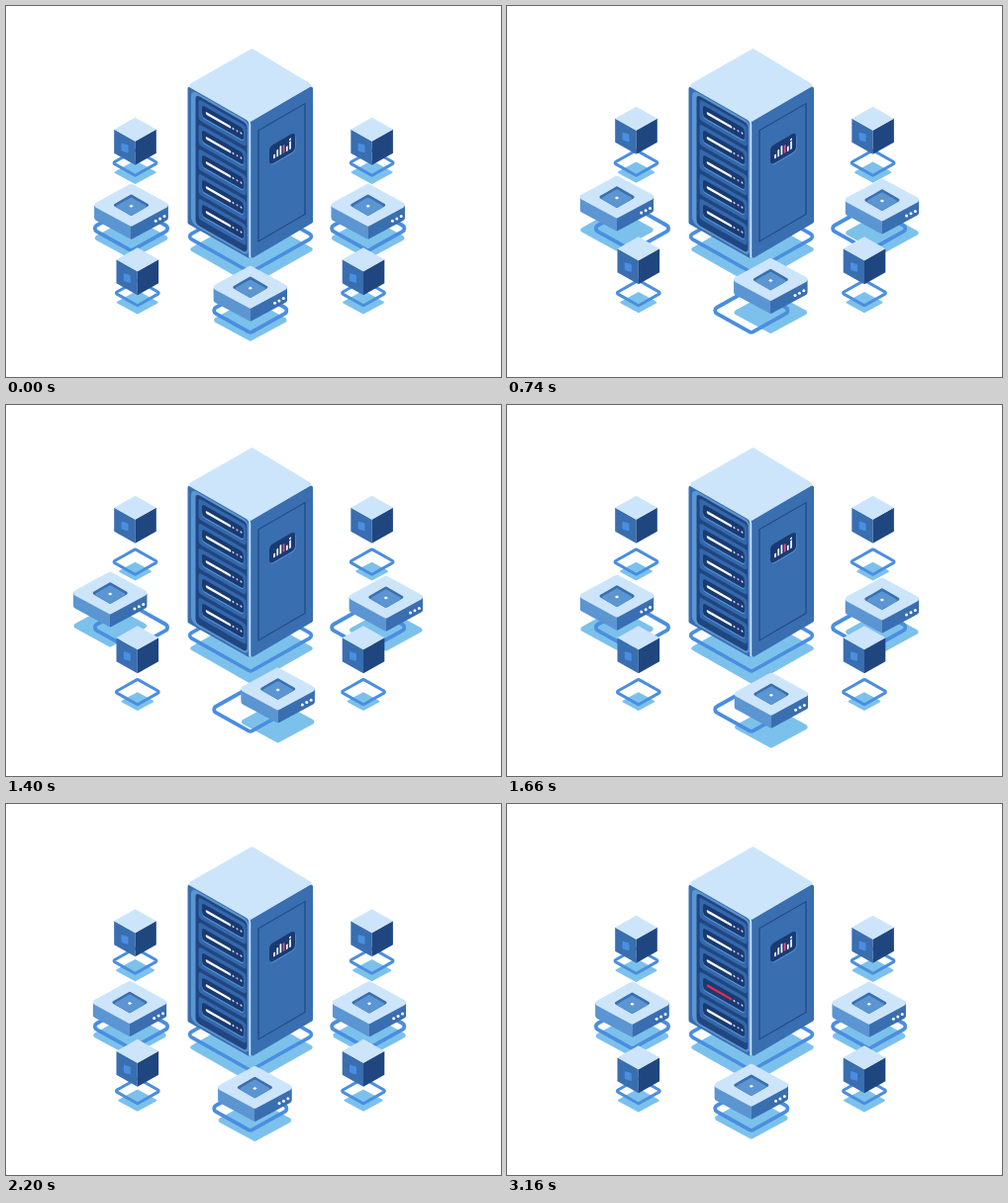
Write an HTML page with a canvas that moves like this. It is 500 px wide and 375 px high and loops after 3.58 s.

```html
<!DOCTYPE html>
<html lang="en">
<head>
<meta charset="utf-8">
<style>
  html, body { margin: 0; width: 100%; height: 100%; overflow: hidden; background: #fff; }
  canvas { display: block; width: 500px; height: 375px; }
</style>
</head>
<body>
<canvas id="stage" width="500" height="375"></canvas>
<script>
const ctx = document.getElementById('stage').getContext('2d');
const LOOP = 3580;
const PALE = '#cce5fb', SKY = '#7cc1eb', RING = '#4a8ee0', LIGHT = '#5b95d2',
      MID = '#396eb0', DARK = '#204680', NAVY = '#193a72', RED = [226, 44, 70];

const ease = p => (1 - Math.cos(Math.PI * Math.min(1, Math.max(0, p)))) / 2;
const ramp = (t, from, to) => ease((t - from) / (to - from));

// Closed polygon with rounded corners
function poly(points, r = 0) {
  const n = points.length, last = points[n - 1];
  ctx.beginPath();
  ctx.moveTo((last[0] + points[0][0]) / 2, (last[1] + points[0][1]) / 2);
  points.forEach((p, i) => {
    const q = points[(i + 1) % n];
    ctx.arcTo(p[0], p[1], (p[0] + q[0]) / 2, (p[1] + q[1]) / 2, r);
  });
  ctx.closePath();
}

function fillPoly(color, points, r) {
  poly(points, r);
  ctx.fillStyle = color;
  ctx.fill();
}

function strokePoly(color, width, points, r) {
  poly(points, r);
  ctx.strokeStyle = color;
  ctx.lineWidth = width;
  ctx.stroke();
}

const rhomb = (x, y, w, h) => [[x, y - h], [x + w, y], [x, y + h], [x - w, y]];
const box = (x, y, w, h) => [[x, y], [x + w, y], [x + w, y + h], [x, y + h]];

function dot(x, y, r, color) {
  ctx.beginPath();
  ctx.arc(x, y, r, 0, 2 * Math.PI);
  ctx.fillStyle = color;
  ctx.fill();
}

function line(x1, y1, x2, y2, width, color, cap = 'round') {
  ctx.beginPath();
  ctx.moveTo(x1, y1);
  ctx.lineTo(x2, y2);
  ctx.lineCap = cap;
  ctx.lineWidth = width;
  ctx.strokeStyle = color;
  ctx.stroke();
}

// Draws in the plane of an upright face
function onFace(x, y, slope, draw) {
  ctx.save();
  ctx.transform(1, slope, 0, 1, x, y);
  draw();
  ctx.restore();
}

function drawServer(alarm) {
  fillPoly(SKY, rhomb(248, 246, 63.8, 36.3), 2);
  strokePoly(RING, 3.6, rhomb(247, 233, 64.5, 36.3), 3);

  fillPoly(MID, [[183.5, 80], [247, 116], [247, 256], [183.5, 220]], 2);
  fillPoly(MID, [[247, 116], [310, 80], [310, 219], [247, 256]], 2);
  fillPoly(PALE, [[248.5, 43], [310, 80], [247, 117], [183.5, 80]], 2);

  onFace(184, 80, 0.571, () => {
    fillPoly(LIGHT, box(3, 2.5, 58.5, 135.5), 6);
    fillPoly(DARK, box(7.5, 5, 52, 131), 4);
    const c = RED.map(v => Math.round(255 + (v - 255) * alarm));
    for (let i = 0; i < 5; i++) {
      const v = 18 + 25 * i;
      fillPoly('#3468ad', box(10.5, v - 10, 48, 21), 3);
      fillPoly(LIGHT, box(14, v - 4.8, 42, 12), 3);
      fillPoly(NAVY, box(14, v - 6, 42, 12), 3);
      line(19, v, 42, v, 2.6, i === 3 ? `rgb(${c})` : '#fff');
      for (let k = 0; k < 3; k++) dot(45.5 + 4 * k, v, 1, k === 1 ? '#e8a6d0' : '#cfe3fa');
    }
  });

  // Highlight along the top and front edge
  ctx.beginPath();
  ctx.moveTo(185, 81);
  ctx.arcTo(246.3, 116, 246.3, 254, 7);
  ctx.lineTo(246.3, 254);
  ctx.lineWidth = 1.8;
  ctx.strokeStyle = PALE;
  ctx.stroke();

  onFace(247, 116, -0.58, () => {
    strokePoly(DARK, 1.2, box(8, 14.5, 47, 112), 0);
    fillPoly(LIGHT, box(19.6, 38.5, 26, 19), 4);
    fillPoly(NAVY, box(19, 37.3, 26, 19), 4);
    [4, 7, 9, 8, 5, 8].forEach((h, i) => {
      const u = 24 + 3.2 * i;
      line(u, 52, u, 52 - h, 1.7, i === 3 ? '#ee4f86' : '#fff', 'butt');
    });
    dot(40, 42, 1, '#fff');
  });
}

function drawCube(x, top, lift) {
  const shrink = 1 - 0.21 * lift;
  fillPoly(SKY, rhomb(x, top + 55.3, 22 * shrink, 12 * shrink), 1);
  strokePoly(RING, 3, rhomb(x, top + 45.8, 22.6, 12.8), 1.2);

  const y = top - 21 * lift;
  fillPoly(MID, [[x - 21.3, y + 12], [x, y + 24], [x, y + 48], [x - 21.3, y + 36]]);
  fillPoly(DARK, [[x, y + 24], [x + 21.3, y + 12], [x + 21.3, y + 36], [x, y + 48]]);
  fillPoly(PALE, rhomb(x, y + 12, 21.3, 12));
  onFace(x - 14, y + 25.6, 0.3, () => fillPoly(RING, box(0, 0, 7, 8), 1));
}

function drawDevice(x0, y0, dx, dy) {
  const x = x0 + dx, y = y0 + dy;
  fillPoly(SKY, rhomb(x, y + 33.3, 39.5, 21.5), 2.5);
  strokePoly(RING, 3.8, rhomb(x0, y0 + 23.6, 40.3, 22.6), 3.5);

  const side = ctx.createLinearGradient(x - 40, 0, x + 40, 0);
  side.addColorStop(0, LIGHT);
  side.addColorStop(0.5, LIGHT);
  side.addColorStop(0.5, MID);
  side.addColorStop(1, MID);
  for (let d = 13; d > 0; d--) fillPoly(side, rhomb(x, y + d, 40.2, 21.8), 2.8);
  fillPoly(PALE, rhomb(x, y, 40.2, 21.8), 2.8);

  fillPoly(MID, rhomb(x, y + 0.1, 19, 11), 1.5);
  fillPoly(LIGHT, rhomb(x, y + 1.5, 16.6, 9.5), 1.5);
  fillPoly('#fff', rhomb(x, y + 1, 2.2, 1.5));
  for (let k = 0; k < 3; k++) dot(x + 24.7 + 4.4 * k, y + 16 - 2.3 * k, 1.5, '#fff');
}

// Route of the front device, one corner every 600 ms
const ROUTE = [[0, 0], [17.8, -9], [31, 0.6], [18.5, 9], [0, 0]];
function routeAt(t) {
  if (t >= 2400) return [0, 0];
  const i = Math.floor(t / 600), p = ease(t / 600 - i);
  return ROUTE[i].map((v, k) => v + (ROUTE[i + 1][k] - v) * p);
}

function draw(t) {
  ctx.fillStyle = '#fff';
  ctx.fillRect(0, 0, 500, 375);

  const out = ramp(t, 0, 1200) - ramp(t, 1200, 2400);
  const lift = ramp(t, 400, 1060) - ramp(t, 1790, 2450);

  drawServer(ramp(t, 2520, 3160));
  drawCube(130.5, 112.8, lift);
  drawCube(369.6, 112.8, lift);
  drawDevice(126.5, 201.2, -22.8 * out, -12 * out);
  drawDevice(365.7, 201.2, 19.4 * out, -7.6 * out);
  drawCube(132.8, 244.3, lift);
  drawCube(361, 244.3, lift);
  drawDevice(246.8, 284.2, ...routeAt(t));
}

const start = performance.now();
function tick(now) {
  draw(Math.max(0, now - start) % LOOP);
  requestAnimationFrame(tick);
}
draw(0);
requestAnimationFrame(tick);
</script>
</body>
</html>
```
